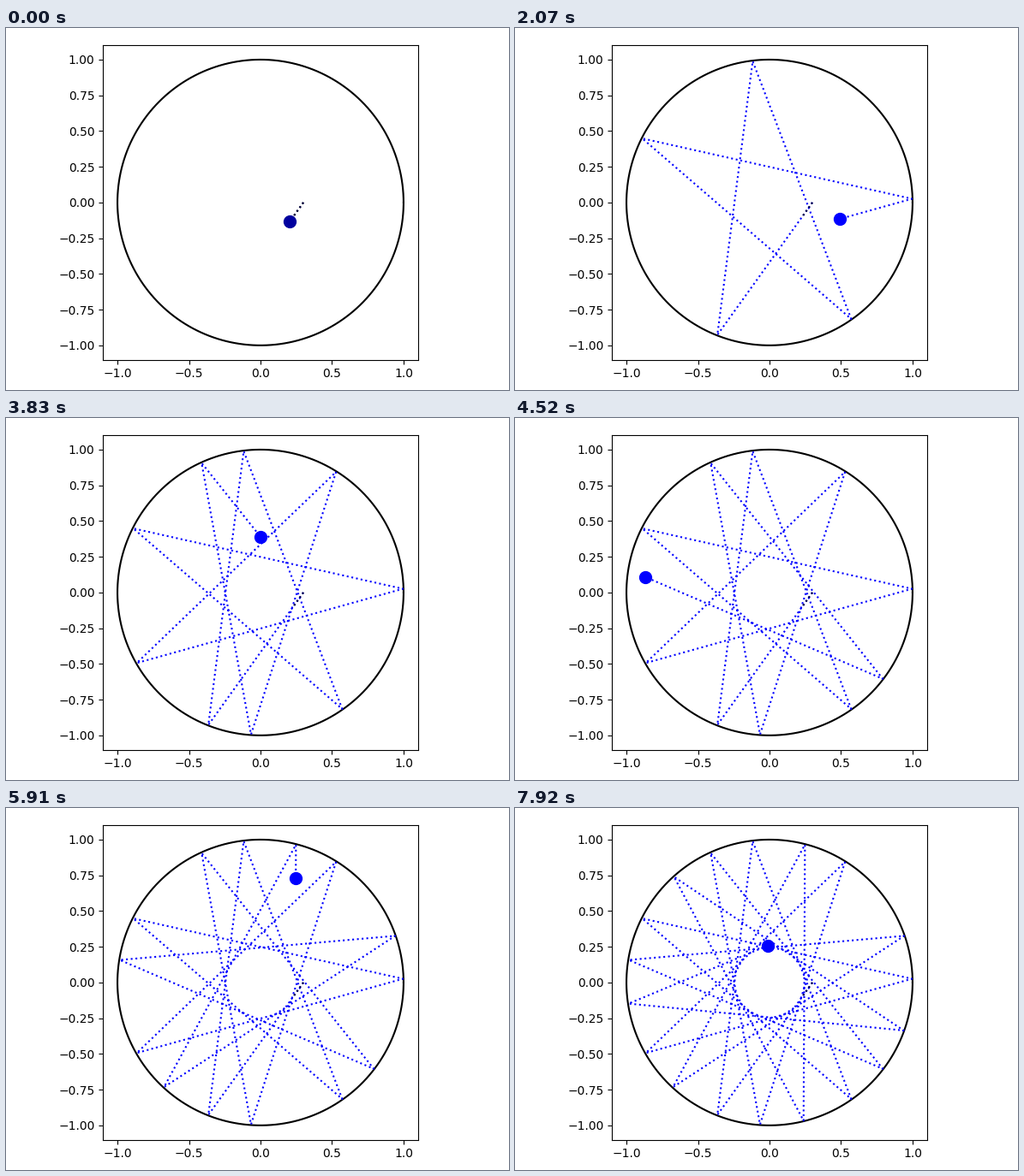
Animation of 587 by 423 pixels, one loop 7990 ms. Source, as a matplotlib script:

```python
import numpy as np
import matplotlib.pyplot as plt
from matplotlib.animation import FuncAnimation

W, H, DPI = 587, 423, 100
LOOP_MS, SLOTS, SUB = 7990, 104, 3
FRAMES = SLOTS * SUB
LEFT, BOTTOM, SIDE = 113.35, 35.47, 367.29      # axes box in pixels
BLUE, NAVY, INK = "#0000ff", "#00009f", "#000038"

# Ball in a round billiard: every bounce turns the hit point by the same angle.
TURN = np.radians(151.765)
FIRST_HIT = np.radians(-111.46)
BOUNCES = 20
SPEED, HEAD_START = 0.3433, 0.161
CHORD = 2 * np.sin(TURN / 2)
FIRST_LEG = 1.1444

angles = FIRST_HIT - TURN * np.arange(BOUNCES)
corner_x = np.r_[0.3, 0.996 * np.cos(angles)]
corner_y = np.r_[0.0, 0.996 * np.sin(angles)]
corner_s = np.r_[0.0, FIRST_LEG + CHORD * np.arange(BOUNCES)]


def point(s):
    return np.interp(s, corner_s, corner_x), np.interp(s, corner_s, corner_y)


def path(s):
    x, y = point(s)
    done = corner_s < s
    return np.r_[corner_x[done], x], np.r_[corner_y[done], y]


def step_at(i):
    """Simulation step on show; the picture stalls a few times near the end."""
    slot = min((i + 1) // SUB, SLOTS - 1)
    if slot >= 96 or slot in (87, 90, 94):
        return slot - 1
    return slot


fig = plt.figure(figsize=(W / DPI, H / DPI), dpi=DPI, facecolor="white")
ax = fig.add_axes([LEFT / W, BOTTOM / H, SIDE / W, SIDE / H])
ax.set(xlim=(-1.1, 1.1), ylim=(-1.1, 1.1),
       xticks=np.linspace(-1, 1, 5), yticks=np.linspace(-1, 1, 9))

t = np.linspace(0, 2 * np.pi, 400)
ax.plot(np.cos(t), np.sin(t), color="black", lw=1.5)
trail, = ax.plot([], [], ":", color=BLUE, lw=1.5)
ax.plot(*path(0.115), ":", color=INK, lw=1.5)
ball, = ax.plot([], [], "o", color=BLUE, ms=10)


def draw(i):
    step = step_at(i)
    s = HEAD_START + SPEED * step
    x, y = point(s)
    trail.set_data(*path(s))
    ball.set_data([x], [y])
    trail.set_color(BLUE if step else INK)
    ball.set_color(BLUE if step else NAVY)
    return trail, ball


anim = FuncAnimation(fig, draw, frames=FRAMES, init_func=lambda: draw(0),
                     interval=LOOP_MS / FRAMES, repeat=True, repeat_delay=0)
plt.show()
```
